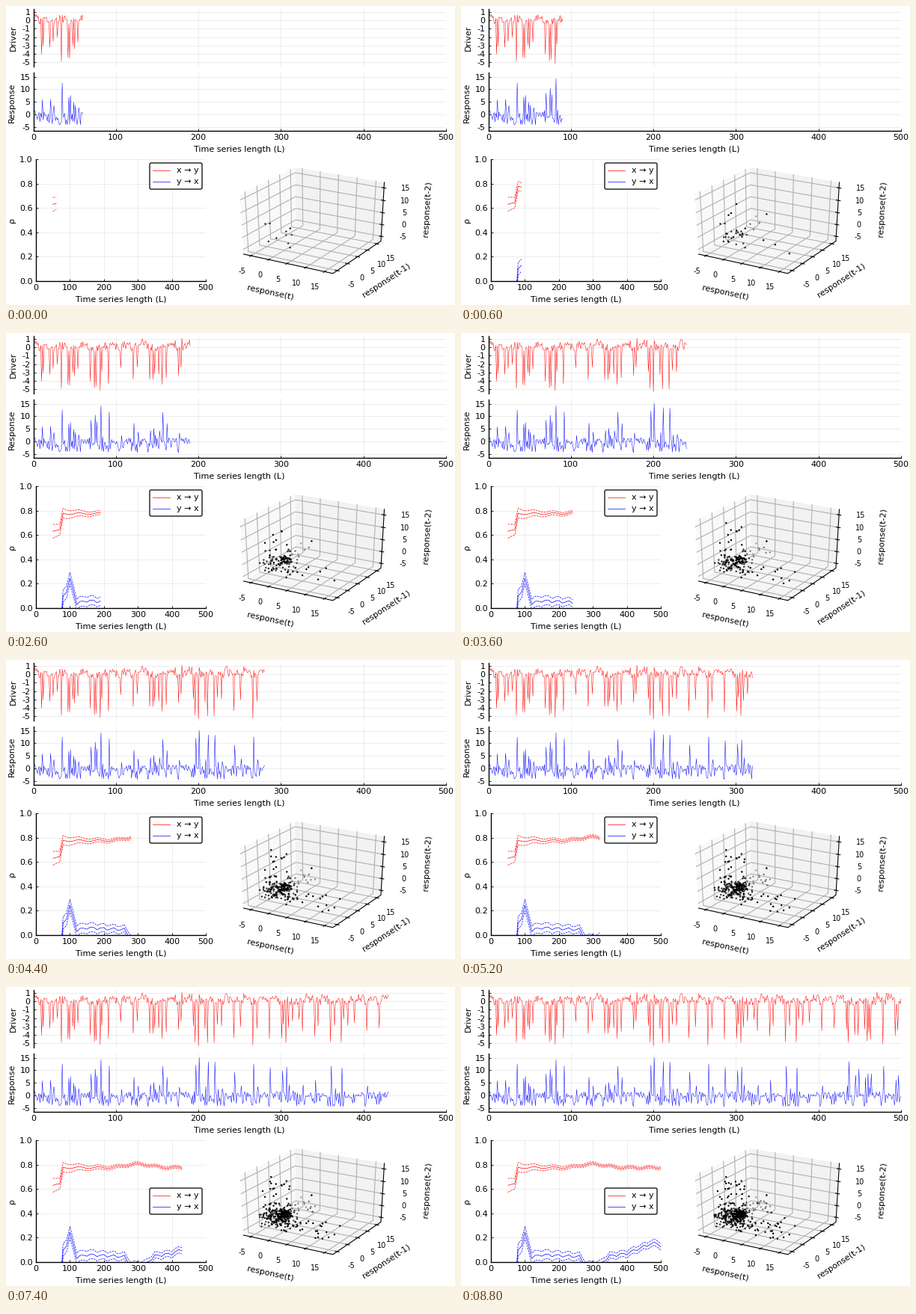
Animation, 600 px wide and 400 px high, one loop 9000 ms. Source, as a matplotlib script:

```python
import numpy as np
import matplotlib.pyplot as plt
from matplotlib.animation import FuncAnimation
from matplotlib.patches import FancyBboxPatch, Polygon

W, H, DPI = 600, 400, 100
N, FIRST, STEP = 500, 60, 10
FRAMES = 45
RED, BLUE = "#ff0000", "#0000ff"

plt.rcParams["font.family"] = "DejaVu Sans"


# ---- time series: a calm driver with sharp dips, and its delayed response

def make_series():
    rng = np.random.default_rng(11)
    t = np.arange(1, N + 1)
    gaps = rng.choice([2, 3, 4, 5, 8, 15], N // 2)
    dips = 10 + np.cumsum(gaps) - gaps[0]
    dips = dips[dips < N]
    busy = np.abs(t[:, None] - dips).min(axis=1) < 4

    x = np.where(busy, 0, 0.4) + 0.3 * rng.standard_normal(N)
    x = np.clip(x, -0.4, 1.2)
    x[dips - 1] = -rng.uniform(2, 5.4, dips.size)

    y = np.where(busy, rng.uniform(-4.5, 1.5, N), rng.normal(0.1, 0.8, N))
    y[1:] += 0.55 * np.minimum(x[:-1], 0) ** 2
    return t, x, np.clip(y, -5.9, 16)


T, DRIVER, RESPONSE = make_series()


# ---- skill curves

LIB = np.arange(50, N + 1, 10)

XY = (0.775 + 0.03 * np.exp(-((LIB - 300) / 50) ** 2)
      + 0.008 * np.sin(LIB / 9) - np.where(LIB < 75, 0.14, 0))
XY_BAND = 0.011 + 0.046 * np.exp((50 - LIB) / 60)

YX_KEYS = [(70, -.3), (80, .10), (90, .13), (100, .245), (120, .04),
           (150, .06), (260, .045), (280, -.03), (320, -.02), (350, .05),
           (400, .07), (470, .15), (490, .155), (500, .13)]
YX = np.interp(LIB, *zip(*YX_KEYS))
YX += np.where(LIB > 110, 0.012 * np.sin(LIB / 5), 0)
YX_BAND = 0.025 + 0.03 * np.exp((70 - LIB) / 100)


# ---- 3D projection to stage pixels

LO, HI = -7.03, 17.18
EYE = 10
AZ, EL = np.radians([-60, 30])
VIEW = np.array([
    [-np.sin(AZ), np.cos(AZ), 0],
    [-np.cos(AZ) * np.sin(EL), -np.sin(AZ) * np.sin(EL), np.cos(EL)],
    [np.cos(AZ) * np.cos(EL), np.sin(AZ) * np.cos(EL), np.sin(EL)]])


def project(points):
    """Return pixel positions and nearness of points in data units."""
    unit = (np.asarray(points, float) - LO) / (HI - LO) - 0.5
    u, v, near = VIEW @ unit.T
    scale = EYE / (EYE - near)
    return np.c_[410.7 + 137.6 * u * scale, 284.4 - 91.55 * v * scale], near


# ---- figure

fig = plt.figure(figsize=(W / DPI, H / DPI), dpi=DPI, facecolor="white")


def panel(left, top, right, bottom, ylim, yticks, bottom_axis=True):
    ax = fig.add_axes([left / W, 1 - bottom / H,
                       (right - left) / W, (bottom - top) / H])
    ax.set(xlim=(0, N), ylim=ylim, xticks=range(0, N + 1, 100), yticks=yticks,
           yticklabels=[str(v) for v in yticks])
    ax.set_axisbelow(True)
    ax.grid(color="black", alpha=0.1, lw=0.5)
    ax.tick_params(direction="in", length=2.5, width=0.6, pad=3, labelsize=8)
    ax.spines[["top", "right"]].set_visible(False)
    ax.spines[["left", "bottom"]].set_linewidth(1)
    if not bottom_axis:
        ax.spines["bottom"].set_visible(False)
        ax.tick_params(axis="x", length=0, labelbottom=False)
    return ax


driver_ax = panel(36.5, 4, 588, 81, (-5.52, 1.35), range(-5, 2), False)
response_ax = panel(36.5, 89, 588, 167, (-6.55, 16.7), range(-5, 16, 5))
skill_ax = panel(40, 205, 267, 368, (0, 1), [v / 5 for v in range(6)])

stage = fig.add_axes([0, 0, 1, 1], zorder=5)
stage.set(xlim=(0, W), ylim=(H, 0))
stage.axis("off")


def label(x, y, text, angle=0, size=8, ha="center"):
    return stage.text(x, y, text, rotation=angle, fontsize=size, ha=ha,
                      va="center")


label(10, 43, "Driver", 90)
label(7.5, 129, "Response", 90)
label(312, 192, "Time series length (L)")
label(154, 393, "Time series length (L)")
label(7.5, 287, "ρ", 90)


# ---- 3D box

def path3d(points, **style):
    xy, _ = project(points)
    stage.plot(xy[:, 0], xy[:, 1], **style)


def pane(corners, shade):
    xy, _ = project(corners)
    stage.add_patch(Polygon(xy, facecolor=str(shade), lw=0, zorder=1))


pane([(LO, LO, LO), (LO, HI, LO), (LO, HI, HI), (LO, LO, HI)], 0.975)
pane([(LO, HI, LO), (HI, HI, LO), (HI, HI, HI), (LO, HI, HI)], 0.95)
pane([(LO, LO, LO), (HI, LO, LO), (HI, HI, LO), (LO, HI, LO)], 0.9625)

GRID = dict(color="#b0b0b0", lw=0.8, zorder=2)
EDGE = dict(color="black", lw=0.8, zorder=3)
OUT = 0.5
for v in range(-5, 16, 5):
    path3d([(v, LO, LO), (v, HI, LO), (v, HI, HI)], **GRID)
    path3d([(HI, v, LO), (LO, v, LO), (LO, v, HI)], **GRID)
    path3d([(LO, LO, v), (LO, HI, v), (HI, HI, v)], **GRID)

    ticks = [((v, LO, LO), (0, OUT, 0), (-12, 21)),
             ((HI, v, LO), (OUT, 0, 0), (19, 19.5)),
             ((HI, HI, v), (OUT, 0, 0), (29, 1))]
    for base, out, (dx, dy) in ticks:
        base, out = np.array(base), np.array(out)
        path3d([base - out, base + out], **EDGE)
        (px, py), = project([base])[0]
        label(px + dx, py + dy, str(v), size=7)

path3d([(LO, LO, LO), (HI, LO, LO), (HI, HI, LO), (HI, HI, HI)], **EDGE)
label(353, 384, "response(t)", -12)
label(508, 367.5, "response(t-1)", 33.5)
label(562.5, 271.5, "response(t-2)", 87)

# Delay embedding; far dots are fainter.
FIRST_DOT = 50
dots, near = project(np.c_[RESPONSE[FIRST_DOT:], RESPONSE[FIRST_DOT - 1:-1],
                           RESPONSE[FIRST_DOT - 2:-2]])
dot_rgba = np.zeros((len(dots), 4))
dot_rgba[:, 3] = np.clip(0.35 + 0.9 * (near - near.min()) / np.ptp(near), 0, 1)
cloud = stage.scatter([], [], s=3, lw=0, zorder=4)


# ---- legend

box = FancyBboxPatch((194, 212), 66, 31, boxstyle="round,pad=2,rounding_size=2",
                     facecolor="white", edgecolor="black", lw=0.9, zorder=6)
stage.add_patch(box)
legend_rows = []
for text, color in (("x → y", RED), ("y → x", BLUE)):
    key, = stage.plot([], [], color=color, lw=0.5, zorder=7)
    name = label(228, 0, text, ha="left")
    name.set_zorder(7)
    legend_rows.append((key, name))


def place_legend(top):
    box.set_y(top + 2)
    for i, (key, name) in enumerate(legend_rows):
        y = top + 10 + 15 * i
        key.set_data([196, 219], [y, y])
        name.set_y(y)


# ---- moving lines

driver_line, = driver_ax.plot([], [], color=RED, lw=0.35)
response_line, = response_ax.plot([], [], color=BLUE, lw=0.35)

skill_lines = []
for mid, band, color in ((XY, XY_BAND, RED), (YX, YX_BAND, BLUE)):
    for side, dash in ((-1, "--"), (0, "-"), (1, "--")):
        line, = skill_ax.plot([], [], dash, color=color, lw=0.5)
        skill_lines.append((line, mid + side * band))


def draw(frame):
    length = FIRST + STEP * frame
    driver_line.set_data(T[:length], DRIVER[:length])
    response_line.set_data(T[:length], RESPONSE[:length])

    shown = LIB <= length
    for line, values in skill_lines:
        line.set_data(LIB[shown], values[shown])

    count = length - FIRST_DOT
    cloud.set_offsets(dots[:count])
    cloud.set_facecolors(dot_rgba[:count])

    # The legend drops once the curves reach its corner.
    place_legend(210 if length < 340 else 269)
    return []


anim = FuncAnimation(fig, draw, frames=FRAMES, interval=200, repeat=True,
                     repeat_delay=0, init_func=lambda: draw(0), blit=False)
plt.show()
```
